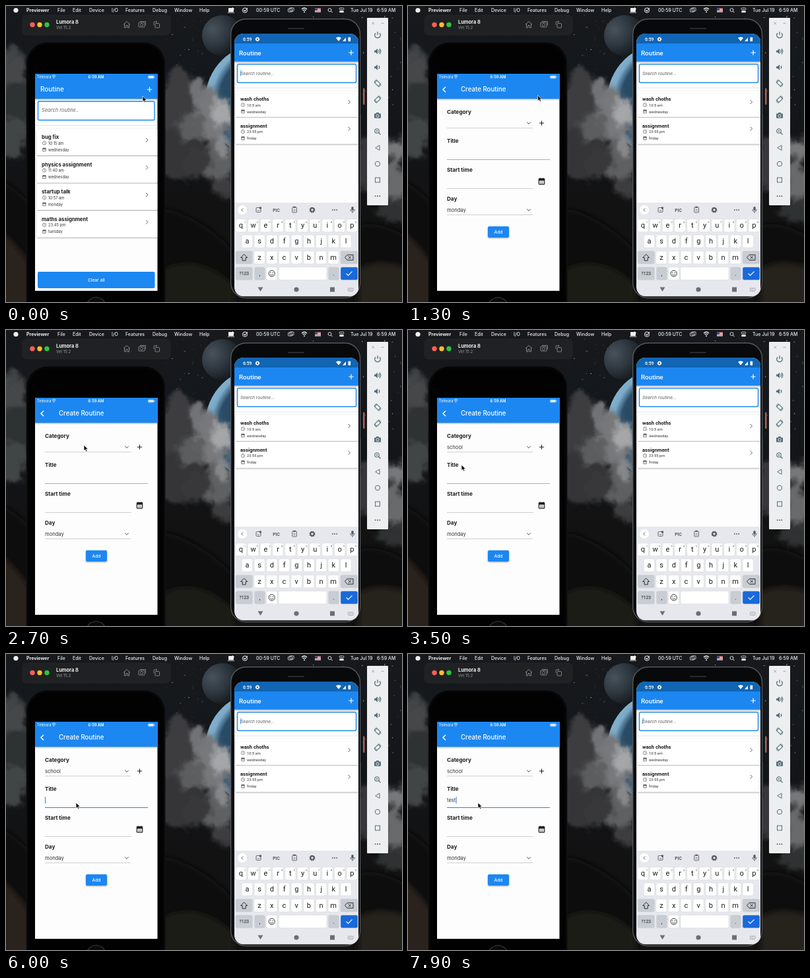
Recreate the animation shown at these times as an HTML page. Size 600 by 450 pixels, loop 8000 ms.

```html
<!DOCTYPE html>
<html lang="en">
<head>
<meta charset="utf-8">
<title>Routine app demo</title>
<style>
html, body { margin: 0; width: 100%; height: 100%; overflow: hidden; background: #0b0c0e; }
svg { display: block; width: 100vw; height: 100vh; }
text { font-family: Inter, "Open Sans", sans-serif; white-space: pre; }
.r text, text.r { font-family: Roboto, "Noto Sans", sans-serif; }
</style>
</head>
<body>
<svg id="stage" viewBox="0 0 600 450" xmlns="http://www.w3.org/2000/svg"></svg>
<script>
const BLUE = '#1b87f1', INK = '#1d1d1f', GREY = '#5f6368', SLATE = '#546e7a';

const rect = (x, y, w, h, fill, r = 0, more = '') =>
  `<rect x="${x}" y="${y}" width="${w}" height="${h}" rx="${r}" fill="${fill}" ${more}/>`;
const circle = (x, y, r, fill, more = '') => `<circle cx="${x}" cy="${y}" r="${r}" fill="${fill}" ${more}/>`;
const line = (d, color, w = 1, more = '') =>
  `<path d="${d}" fill="none" stroke="${color}" stroke-width="${w}" ${more}/>`;
const shape = (d, fill, more = '') => `<path d="${d}" fill="${fill}" ${more}/>`;
const text = (s, x, y, size, fill = INK, weight = 400, more = '') =>
  `<text x="${x}" y="${y}" font-size="${size}" fill="${fill}" font-weight="${weight}" ${more}>${s}</text>`;
const mid = 'text-anchor="middle"';
const at = (x, y, body, id = '') => `<g ${id && `id="${id}"`} transform="translate(${x} ${y})">${body}</g>`;
const frame = (x, y, w, h, color, sw = 1, r = 0) =>
  rect(x, y, w, h, 'none', r, `stroke="${color}" stroke-width="${sw}"`);

// Icons, centred on the given point
const plus = (x, y, s, c, w = 1.2) => line(`M${x - s} ${y}h${2 * s}M${x} ${y - s}v${2 * s}`, c, w);
const right = (x, y, c = GREY) => line(`M${x - 1.5} ${y - 3}l3 3l-3 3`, c, 1);
const left = (x, y, c, s = 3) => line(`M${x + s / 2} ${y - s}l${-s} ${s}l${s} ${s}`, c, s / 2.7);
const down = (x, y) => line(`M${x - 2.8} ${y - 1.4}l2.8 2.8l2.8 -2.8`, '#444', 1);
const clock = (x, y) => circle(x, y, 2.7, 'none', `stroke="${GREY}" stroke-width=".7"`) +
  line(`M${x} ${y - 1.7}v1.9l1.3 .8`, GREY, .6);
const calendar = (x, y, s = 1, c = GREY) => at(x, y, `<g transform="scale(${s})">` +
  frame(-2.4, -2.2, 4.8, 4.8, c, .7, .4) + rect(-2.4, -2.2, 4.8, 1.7, c) +
  line('M-1.3 -3v1M1.3 -3v1', c, .7) + line('M-1.4 .5h2.8M-1.4 1.6h2.8', c, .5, 'stroke-dasharray=".6 .5"') + '</g>');
const wifi = (x, y, s, c) => line(`M${x - s} ${y - s * .5}q${s} ${-s} ${2 * s} 0M${x - s * .6} ${y}q${s * .6} ${-s * .6} ${s * 1.2} 0`, c, s * .3) +
  circle(x, y + s * .5, s * .25, c);
const gear = (x, y, r, c) => circle(x, y, r * .68, 'none', `stroke="${c}" stroke-width="${r * .5}"`) +
  circle(x, y, r * .95, 'none', `stroke="${c}" stroke-width="${r * .3}" stroke-dasharray="${r * .4} ${r * .346}"`);
const dots = (x, y, c, r = .9, gap = 3.2) => [-gap, 0, gap].map(d => circle(x + d, y, r, c)).join('');

function backdrop() {
  let seed = 7;
  const rnd = () => (seed = seed * 16807 % 2147483647) / 2147483647;
  let stars = '';
  for (let i = 0; i < 240; i++) {
    const x = 240 + rnd() * 360, y = 14 + rnd() * 170;
    stars += circle(x.toFixed(1), y.toFixed(1), (.3 + rnd() * .5).toFixed(2), '#c3ced6', `opacity="${(.25 + rnd() * .7).toFixed(2)}"`);
  }
  const puffs = [
    [8, 150, 34, 85, '#2f3031'], [10, 100, 22, 26, '#454648'], [10, 200, 22, 32, '#434445'],
    [262, 150, 30, 55, '#3c3d3f'], [262, 225, 30, 45, '#353638'], [290, 130, 17, 20, '#717274'],
    [312, 170, 30, 42, '#77787a'], [326, 160, 16, 24, '#a5a6a7'], [280, 185, 18, 20, '#5c5d5f'],
    [322, 232, 28, 32, '#5f6062'], [334, 212, 13, 16, '#868789'], [290, 240, 20, 20, '#38393b'],
    [332, 276, 20, 16, '#3d3e40'],
    [560, 240, 34, 45, '#38393b'], [590, 218, 15, 20, '#77787a'], [590, 268, 18, 30, '#696a6c'], [588, 312, 28, 18, '#2f3032']
  ].map(([x, y, rx, ry, c]) => `<ellipse cx="${x}" cy="${y}" rx="${rx}" ry="${ry}" fill="${c}"/>`).join('');
  return rect(0, 0, 600, 450, 'url(#sky)') + stars +
    circle(328, 45, 31, 'url(#moon)') + circle(388, 143, 86, 'url(#planet)') +
    `<g filter="url(#cloud)">${puffs}</g>` +
    `<g filter="url(#blur)">${shape('M-20 262Q10 268 45 310L250 310Q300 325 345 372V470H-20Z', '#0b0a09') +
    shape('M-20 335Q8 350 45 405V470H-20Z', '#2a231a') +
    shape('M240 400Q290 375 345 425V470H240Z', '#1f1b17') +
    shape('M530 335Q570 322 620 360V470H530Z', '#110f0d') +
    shape('M535 400Q570 380 620 405V470H535Z', '#28221b')}</g>`;
}

function menuBar() {
  const words = [['File', 78], ['Edit', 101], ['Device', 126], ['I/O', 160], ['Features', 181], ['Debug', 222],
    ['Window', 255], ['Help', 293], ['00:59 UTC', 379], ['Tue Jul 19', 522], ['6:59 AM', 562]];
  const w = '#f1f1f1';
  return rect(0, 0, 600, 13, '#17191d') + circle(15, 6.5, 3.6, w) +
    text('Previewer', 31, 9, 7, w, 700) + words.map(([s, x]) => text(s, x, 9, 7, w, 500)).join('') +
    rect(337, 3, 8, 6, w, 1) + line('M336 10l10 0M343 2l3 3', w, .9) +
    circle(362, 6.5, 3.6, 'none', `stroke="${w}"`) + line('M360 6l2 2l4 -5', w, 1.1) +
    frame(427.5, 4, 6, 5, w, .8, 1) + frame(430, 2.8, 6, 5, w, .8, 1) + wifi(452, 7, 4, w) +
    rect(468, 3.5, 9, 6, '#eee') + line('M468 4.2h9M468 6.2h9M468 8.2h9', '#d0454d', .9) + rect(468, 3.5, 4, 3.2, '#324a86') +
    circle(490.5, 6, 2.5, 'none', `stroke="${w}" stroke-width=".9"`) + line('M492.5 8l2 2', w, 1) +
    frame(505, 3, 7, 2.6, w, .8, 1.3) + rect(505, 7, 7, 3, w, 1.5);
}

function simWindow() {
  const c = '#8d8d8f';
  return rect(25, 14, 224, 30, '#202123', 6, 'stroke="#2c2d31" stroke-width=".5"') +
    circle(40, 28.5, 3.7, '#fe5f57') + circle(51, 28.5, 3.7, '#febc2e') + circle(62, 28.5, 3.7, '#28c840') +
    text('Lumora 8', 76, 27.2, 7.4, '#f2f2f2', 700) + text('Vel 15.2', 76, 35.3, 6.2, '#9a9a9c') +
    line('M178 28l5 -4.5l5 4.5M179.5 27v6h2.3v-3.5h2.4v3.5h2.3v-6', c, .9) +
    frame(201, 25, 9, 7, c, .9, 1) + circle(205.5, 28.5, 2, 'none', `stroke="${c}" stroke-width=".8"`) + line('M203 23.5h8.5v6', c, .8) +
    frame(226, 26.5, 6.5, 6.5, c, .9, 1) + line('M224 29v-5h5M227.5 22.5l1.5 1.5l-1.5 1.5', c, .8);
}

const card = (x, y, w, h) => rect(x, y, w, h, '#fff', 1, 'filter="url(#drop)"');

function item(x, y, chevron, size, [title, time, day]) {
  return text(title, x, y, size, INK, 700) + clock(x + 4, y + 6.3) + text(time, x + 10, y + 8.5, 5.8, '#333') +
    calendar(x + 4, y + 16.3) + text(day, x + 10, y + 18.5, 5.8, '#333') + right(chevron, y + 2);
}

const bar = () => rect(44, 103, 186, 38, BLUE, 0, 'filter="url(#drop)"');

function listPage() {
  const rows = [['bug fix', '10:15 am', 'wednesday'], ['physics assignment', '11:40 am', 'wednesday'],
    ['startup talk', '10:57 am', 'monday'], ['maths assignment', '23:45 pm', 'tuesday']];
  return rect(44, 103, 186, 330, '#fdfdfd') + bar() + text('Routine', 52, 130.3, 9.9, '#fff', 500) +
    plus(217.5, 127, 3.8, '#fff') + rect(48.5, 145, 176.5, 28.5, '#fff', 2, `stroke="${BLUE}" stroke-width="1.4"`) +
    text('Search routine..', 54, 161.3, 7.5, '#666', 400, 'font-style="italic"') +
    line('M44 181.5h186', '#e4e4e4', .8) +
    rows.map((r, i) => card(46.5, 187 + i * 41.5, 183, 40) + item(54, 202 + i * 41.5, 213.5, 7.8, r)).join('') +
    rect(48, 404, 177.5, 25, BLUE, 2) + text('Clear all', 136.7, 419, 6.6, '#fff', 500, mid);
}

function formPage() {
  const rule = (y, end, id = '') => line(`M59 ${y}H${end}`, '#c6c6c6', .8, id);
  const label = (s, y) => text(s, 59, y, 8.1, INK, 700);
  return rect(41, 103, 3, 330, '#000', 0, 'opacity=".04"') + rect(44, 103, 190, 330, '#fdfdfd') + bar() +
    left(55, 127, '#fff', 4) + text('Create Routine', 80, 130.3, 9.7, '#fff', 500) +
    label('Category', 163.7) + label('Title', 207.7) + label('Start time', 251.7) + label('Day', 295.7) +
    text('', 59, 180.5, 7.6, '#333', 400, 'id="category"') + text('', 59, 224.5, 7.6, '#333', 400, 'id="title"') +
    text('monday', 59, 312.5, 7.6, '#333') +
    rule(185.5, 189) + rule(233.5, 215, 'id="titleRule"') + rule(277.5, 190) + rule(317.5, 189) +
    rect(59, 217, 1, 10.5, BLUE, .4, 'id="caret"') +
    down(183, 178) + down(183, 310) + plus(202.5, 178, 3.6, INK, 1.1) + calendar(202.5, 266.5, 1.75, INK) +
    rect(121, 335, 32, 17, BLUE, 2, 'filter="url(#drop)"') + text('Add', 137, 346, 6.7, '#fff', 500, mid);
}

function leftPhone() {
  return rect(31, 55, 210, 430, '#060606', 32, 'stroke="#161617" stroke-width="1"') +
    rect(34.5, 58.5, 203, 430, '#020202', 29) +
    circle(136.5, 458, 15, '#0a0a0b', 'stroke="#3b3b3d" stroke-width="1.2"') +
    `<g clip-path="url(#screen)">${at(0, 0, listPage(), 'list') + at(186, 0, formPage(), 'form')}</g>` +
    text('Telmora', 47, 110, 5.6, '#fff') + wifi(72.5, 108, 3, '#fff') +
    text('6:59 AM', 136.5, 110, 5.8, '#fff', 600, mid) +
    frame(215.5, 106, 8.5, 4, '#fff', .6, 1) + rect(216.3, 106.7, 7, 2.6, '#fff', .5) + rect(224.6, 107.2, .8, 1.6, '#fff');
}

function keyboard() {
  const key = (x, y, w, fill = '#fff') => rect(x, y, w, 19.5, fill, 2.5, 'stroke="#c9ccd1" stroke-width=".4"');
  const row = (s, x0, y) => [...s].map((c, i) => {
    const x = +(x0 + i * 18.7).toFixed(1);
    return key(x - 8.2, y, 16.4) + text(c, x, y + 13, 11, INK, 400, mid) +
      (s.length > 9 ? text((i + 1) % 10, x + 6, y + 5.5, 4.3, GREY, 400, mid) : '');
  }).join('');
  const dark = '#c8ccd3', g = '#555a60';
  return rect(346, 299, 188, 145, '#e6e8ed') +
    circle(358, 310, 7, '#fff') + left(358, 310, g, 2.5) +
    frame(379, 306.5, 7, 7, g, .9, 1.3) + line('M380.8 310.5q1.8 2 3.6 0', g, .8) + rect(384, 305.5, 3, 3, g, .5) +
    text('PIC', 409.5, 312.5, 6.6, g, 700, mid) +
    frame(433.8, 306, 6.6, 8, g, .9, .8) + rect(435.3, 304.8, 3.6, 2, g) + line('M435.5 309.5h3.2M435.5 311.5h3.2', g, .6) +
    gear(464, 310, 4, g) + dots(498, 310, g) +
    rect(523.3, 305, 3.4, 6, g, 1.7) + line('M521.7 309q0 3.5 3.3 3.5q3.3 0 3.3 -3.5M525 312.5v2.5', g, .9) +
    row('qwertyuiop', 356, 324) + row('asdfghjkl', 365.5, 348) + row('zxcvbnm', 384, 372.5) +
    key(348, 372.5, 25.5, dark) + shape('M360.7 377.5l5 5h-2.5v4.5h-5v-4.5h-2.5z', 'none', `stroke="${INK}" stroke-width=".9"`) +
    key(507, 372.5, 26, dark) + shape('M513.5 382.3l3.5 -4h9v8h-9z', 'none', `stroke="${INK}" stroke-width=".9"`) +
    line('M518.7 380.3l4 4m0 -4l-4 4', INK, .9) +
    key(348, 397, 25.5, dark) + text('?123', 360.7, 409.3, 6.7, INK, 400, mid) +
    key(376.5, 397, 16, dark) + text(',', 384.5, 410, 9, INK, 400, mid) +
    key(394.5, 397, 16.4) + circle(402.7, 406.7, 4.6, 'none', `stroke="${INK}" stroke-width=".9"`) +
    circle(401, 405.5, .7, INK) + circle(404.4, 405.5, .7, INK) + line('M400.2 408q2.5 2.5 5 0', INK, .8) +
    key(413, 397, 73) + key(488.5, 397, 16, dark) + text('.', 496.5, 410, 9, INK, 400, mid) +
    key(507, 397, 26, '#1969d9') + line('M515.5 406.7l3 3l6 -6', '#fff', 1.2) +
    shape('M381.5 427.5h8l-4 6.5z', '#6b6f75') + circle(440, 431, 3.6, '#6b6f75') + rect(491, 427.5, 7, 7, '#6b6f75') +
    frame(518.5, 429, 7.5, 4.5, '#92969b', .7, .7) + line('M520 430.5h4.5M520 432h4.5', '#92969b', .6, 'stroke-dasharray=".8 .5"');
}

function rightPhone() {
  const rows = [['wash choths', '10:5 am', 'wednesday'], ['assignment', '23:55 pm', 'friday']];
  return rect(541, 125, 2.5, 25, '#a5615c', 1) + rect(536, 165, 2, 42, '#2c2d30', 1) +
    rect(340.7, 19.7, 195.8, 424, '#08090a', 23, 'stroke="#55575b" stroke-width="1.4"') +
    rect(427, 33.5, 25, 1.5, '#333538', .7) +
    `<g class="r" clip-path="url(#screen2)">${rect(346, 42, 188, 260, '#fdfdfd') +
    rect(346, 57, 188, 27.5, BLUE, 0, 'filter="url(#drop)"') + rect(346, 42, 188, 15, '#1165b3') +
    text('6:59', 359, 52.8, 6.8, '#fff', 500) + gear(381, 50.5, 3, '#fff') +
    shape('M500 48.5q4 -3.2 8 0l-4 5z', '#fff') + shape('M510 53.5h5v-5.5z', '#fff') + rect(518.5, 47.5, 3.6, 6.3, '#fff', .7) +
    text('Routine', 353, 74.7, 9.8, '#fff', 500) + plus(523, 71, 3.7, '#fff') +
    rect(350.5, 88.5, 180, 28, '#fff', 2, `stroke="${BLUE}" stroke-width="1.4"`) +
    text('Search routine...', 355, 104.6, 7.4, '#666', 400, 'font-style="italic"') +
    line('M356.2 97.5l-1.2 9', BLUE, .9, 'id="caret2"') + line('M346 124.5h188', '#e4e4e4', .8) +
    rows.map((r, i) => card(348, 129 + i * 41, 186, 39.5) + item(355, 144 + i * 40.7, 520, 7.7, r)).join('') +
    keyboard()}</g>`;
}

function toolbar() {
  const x = 563, c = SLATE;
  const pen = (d, w = 1.2) => line(d, c, w);
  const speaker = y => shape(`M${x - 5} ${y - 1.5}h2l3 -2.7v8.4l-3 -2.7h-2z`, c);
  const turn = (y, s) => at(x, y, `<g transform="scale(${s} 1)">` + rect(-2.5, -4, 5, 8, 'none', .6, `stroke="${c}" stroke-width="1.1" transform="rotate(-45)"`) +
    line('M-5 -1q0 -4 4 -4.5M5 1q0 4 -4 4.5', c, .8) + '</g>');
  return rect(547, 18, 32, 285, '#eceeef', 1) + line('M554.5 24.5l3.5 3.5m0 -3.5l-3.5 3.5M568.5 26.3h4', '#8d989d', .8) +
    pen('M560 41.2a4.3 4.3 0 1 0 6 0M563 39v5', 1.3) +
    speaker(69) + pen('M564.5 66.7q2 2.3 0 4.6M566 65q3.5 4 0 8') + speaker(93.3) + pen('M564.8 91q2 2.3 0 4.6') +
    turn(117.5, 1) + turn(142, -1) +
    rect(558, 163.5, 10, 7, c, 1) + rect(561, 162, 4, 2, c) + circle(563, 167, 2.1, c, 'stroke="#eceeef" stroke-width=".9"') +
    circle(562, 190, 3.3, 'none', `stroke="${c}" stroke-width="1.1"`) + pen('M564.5 192.5l3 3') + plus(562, 190, 1.5, c, .8) +
    pen('M566 211.8v7.6l-6.3 -3.8z', 1) + circle(x, 240, 3.7, 'none', `stroke="${c}" stroke-width="1"`) +
    frame(559.5, 261, 7, 7, c, 1) + dots(x, 289, c, 1, 3.4);
}

const fade = (id, cx, cy, stops) => `<radialGradient id="${id}" cx="${cx}" cy="${cy}" r=".75">` +
  stops.map(([o, c]) => `<stop offset="${o}" stop-color="${c}"/>`).join('') + '</radialGradient>';

const $ = id => document.getElementById(id);
$('stage').innerHTML = `<defs>
  <linearGradient id="sky" x2="0" y2="1"><stop stop-color="#17191c"/><stop offset=".22" stop-color="#14181c"/>
    <stop offset=".65" stop-color="#121213"/><stop offset="1" stop-color="#141210"/></linearGradient>
  ${fade('moon', .25, .35, [[0, '#48525b'], [.5, '#2f3840'], [1, '#12171b']])}
  ${fade('planet', .62, .55, [[0, '#1b3444'], [.68, '#2a4d68'], [.77, '#7aa9c8'], [1, '#9cc2da']])}
  <filter id="cloud" x="-10%" y="-10%" width="120%" height="120%">
    <feGaussianBlur stdDeviation="4.5" result="b"/>
    <feTurbulence type="fractalNoise" baseFrequency=".035" numOctaves="4" seed="4"/>
    <feDisplacementMap in="b" scale="34" xChannelSelector="R" yChannelSelector="G"/>
  </filter>
  <filter id="blur"><feGaussianBlur stdDeviation="4"/></filter>
  <filter id="drop" x="-5%" y="-10%" width="110%" height="130%"><feDropShadow dx="0" dy="1" stdDeviation="1" flood-opacity=".38"/></filter>
  <clipPath id="screen">${rect(44, 103, 185.5, 330, '#000')}</clipPath>
  <clipPath id="screen2">${rect(346, 42, 188.5, 399.5, '#000', 14)}</clipPath>
</defs>` + backdrop() + menuBar() + simWindow() + leftPhone() + rightPhone() + toolbar() +
  at(0, 0, shape('M0 0v8.5l2 -1.8l1.3 3l1.6 -.7l-1.3 -2.9h2.7z', '#080808', 'stroke="#fff" stroke-width=".7"'), 'pointer');

// Ease curve of the page push
function pushEase(p) {
  if (p <= 0 || p >= 1) return p <= 0 ? 0 : 1;
  const bez = (a, b, u) => 3 * a * u * (1 - u) ** 2 + 3 * b * u * u * (1 - u) + u ** 3;
  let lo = 0, hi = 1;
  for (let i = 0; i < 20; i++) {
    const m = (lo + hi) / 2;
    if (bez(.35, .33, m) < p) lo = m; else hi = m;
  }
  return bez(.91, .97, lo);
}

// Pointer stops: time, x, y
const path = [[0, 207, 137], [200, 207, 137], [500, 216, 126], [1100, 216, 126], [1800, 118, 175],
  [2800, 118, 175], [3400, 81, 205], [3800, 81, 205], [4300, 106, 226], [8000, 106, 226]];
function pointerAt(t) {
  const i = path.findIndex(k => k[0] > t);
  const [t0, x0, y0] = path[i - 1], [t1, x1, y1] = path[i];
  const p = (t - t0) / (t1 - t0), e = p * p * (3 - 2 * p);
  return [x0 + (x1 - x0) * e, y0 + (y1 - y0) * e];
}

const keys = [6700, 6900, 7200, 7400];
const move = (id, x, y = 0) => $(id).setAttribute('transform', `translate(${x.toFixed(2)} ${y.toFixed(2)})`);
const show = (id, on) => $(id).setAttribute('visibility', on ? 'visible' : 'hidden');

function draw(t) {
  const push = pushEase((t - 465) / 400);
  move('list', -62 * push);
  move('form', 186 * (1 - push));
  move('pointer', ...pointerAt(t));

  $('category').textContent = t >= 2800 ? 'school' : '';
  const typed = keys.filter(k => t >= k).length;
  $('title').textContent = 'test'.slice(0, typed);
  const focus = t >= 4300;
  $('titleRule').setAttribute('stroke', focus ? BLUE : '#9c9c9c');
  $('titleRule').setAttribute('stroke-width', focus ? 1.2 : .8);
  $('caret').setAttribute('x', 59 + (typed ? $('title').getComputedTextLength() + .3 : 0));
  show('caret', focus && (t >= keys[0] || (t + 400) % 1000 < 500));
  show('caret2', (t + 250) % 1000 < 500);
}

const start = performance.now();
function tick() {
  const t = (performance.now() - start) % 8000;
  draw(Math.floor(t / 100) * 100);
  requestAnimationFrame(tick);
}
tick();
</script>
</body>
</html>
```
